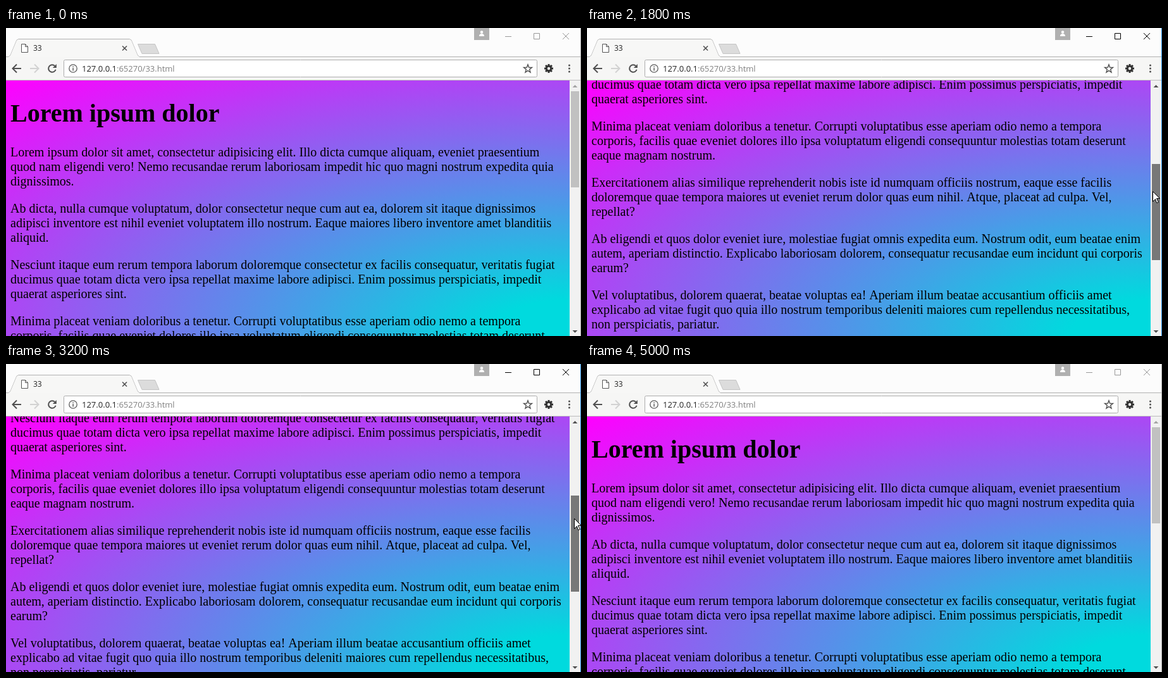
An HTML page with a canvas that plays this animation: 909x487 px, repeating every 5100 ms.

```html
<!DOCTYPE html>
<html lang="en">
<head>
<meta charset="utf-8">
<title>33</title>
<style>
  html, body { margin: 0; width: 100%; height: 100%; overflow: hidden; background: #fff; }
  canvas { display: block; }
</style>
</head>
<body>
<canvas id="stage" width="909" height="487"></canvas>
<script>
const ctx = document.getElementById('stage').getContext('2d');
const W = 909, H = 487, LOOP = 5100, STEP = 100;
const PAGE = { top: 83, width: 891 };
const LINE = 23, PARAGRAPH = 89;
const SERIF = '"Liberation Serif", "Times New Roman", serif';
const SANS = '"Open Sans", sans-serif';
const INK = '#505050';

const paragraphs = `
Lorem ipsum dolor sit amet, consectetur adipisicing elit. Illo dicta cumque aliquam, eveniet praesentium
quod nam eligendi vero! Nemo recusandae rerum laboriosam impedit hic quo magni nostrum expedita quia
dignissimos.

Ab dicta, nulla cumque voluptatum, dolor consectetur neque cum aut ea, dolorem sit itaque dignissimos
adipisci inventore est nihil eveniet voluptatem illo nostrum. Eaque maiores libero inventore amet blanditiis
aliquid.

Nesciunt itaque eum rerum tempora laborum doloremque consectetur ex facilis consequatur, veritatis fugiat
ducimus quae totam dicta vero ipsa repellat maxime labore adipisci. Enim possimus perspiciatis, impedit
quaerat asperiores sint.

Minima placeat veniam doloribus a tenetur. Corrupti voluptatibus esse aperiam odio nemo a tempora
corporis, facilis quae eveniet dolores illo ipsa voluptatum eligendi consequuntur molestias totam deserunt
eaque magnam nostrum.

Exercitationem alias similique reprehenderit nobis iste id numquam officiis nostrum, eaque esse facilis
doloremque quae tempora maiores ut eveniet rerum dolor quas eum nihil. Atque, placeat ad culpa. Vel,
repellat?

Ab eligendi et quos dolor eveniet iure, molestiae fugiat omnis expedita eum. Nostrum odit, eum beatae enim
autem, aperiam distinctio. Explicabo laboriosam dolorem, consequatur recusandae eum incidunt qui corporis
earum?

Vel voluptatibus, dolorem quaerat, beatae voluptas ea! Aperiam illum beatae accusantium officiis amet
explicabo ad vitae fugit quo quia illo nostrum temporibus deleniti maiores cum repellendus necessitatibus,
non perspiciatis, pariatur.

Laboriosam corrupti ad numquam id deleniti eum necessitatibus voluptatum doloremque praesentium,
beatae, atque alias eaque pariatur ullam nam molestiae! Dolores temporibus eligendi vero, expedita odit
dolorem vitae nobis at, corporis.

Molestias accusamus minus, quibusdam culpa fuga ad autem amet illo itaque quaerat saepe voluptatum ab
`.trim().split('\n\n').map(p => p.split('\n'));

// Drag down, pause, drag back up: [time, offset]
const scrollKeys = [[500, 0], [1100, 93], [1800, 308], [2300, 428], [2500, 428], [3200, 289], [3700, 140], [4300, 0]];

const progress = (t, from, to) => Math.min(1, Math.max(0, (t - from) / (to - from)));
const lerp = (a, b, u) => a + (b - a) * u;

// Smooth monotone path through the keys
function curve(keys, t) {
  const last = keys.length - 1;
  if (t <= keys[0][0]) return keys[0][1];
  if (t >= keys[last][0]) return keys[last][1];
  const slope = i => (keys[i + 1][1] - keys[i][1]) / (keys[i + 1][0] - keys[i][0]);
  const tangent = i => {
    if (i === 0 || i === last) return 0;
    const a = slope(i - 1), b = slope(i);
    return a * b <= 0 ? 0 : 2 * a * b / (a + b);
  };
  const i = keys.findIndex(k => t < k[0]) - 1;
  const [t0, v0] = keys[i], [t1, v1] = keys[i + 1];
  const d = t1 - t0, u = (t - t0) / d;
  return lerp(v0, v1, u * u * (3 - 2 * u)) + d * u * (1 - u) * ((1 - u) * tangent(i) - u * tangent(i + 1));
}

function pointer(t, thumbY) {
  const drift = 1 - (1 - progress(t, 1800, 3700)) ** 2;
  const sway = 7 * Math.exp(-(((t - 1800) / 300) ** 2));
  const leave = t >= 4500 ? 5 : 0;
  const grip = lerp(43, 35, drift) - 50 * (1 - progress(t, 100, 300));
  return [Math.round(lerp(900.6, 898, drift) - sway + leave), thumbY + Math.round(grip)];
}

function rect(x, y, w, h, color) {
  ctx.fillStyle = color;
  ctx.fillRect(x, y, w, h);
}

function paint({ fill, stroke, width = 1 }) {
  if (fill) { ctx.fillStyle = fill; ctx.fill(); }
  if (stroke) { ctx.strokeStyle = stroke; ctx.lineWidth = width; ctx.stroke(); }
}

function path(points, style) {
  ctx.beginPath();
  points.forEach(([x, y]) => ctx.lineTo(x, y));
  if (style.close) ctx.closePath();
  paint(style);
}

function arc(x, y, r, style, from = 0, to = Math.PI * 2) {
  ctx.beginPath();
  ctx.arc(x, y, r, from, to);
  paint(style);
}

function box(x, y, w, h, style, radius = 0) {
  ctx.beginPath();
  ctx.roundRect(x, y, w, h, radius);
  paint(style);
}

function text(str, x, y, font, color) {
  ctx.font = font;
  ctx.fillStyle = color;
  ctx.fillText(str, x, y);
}

function cross(x, y, r, style) {
  path([[x - r, y - r], [x + r, y + r]], style);
  path([[x - r, y + r], [x + r, y - r]], style);
}

function drawPage(scroll) {
  const h = H - PAGE.top;
  ctx.save();
  ctx.beginPath();
  ctx.rect(0, PAGE.top, PAGE.width, h);
  ctx.clip();

  // Elliptical gradient from the bottom right to the far corner
  ctx.save();
  ctx.translate(PAGE.width, H);
  ctx.scale(PAGE.width, h);
  const glow = ctx.createRadialGradient(0, 0, 0.1 * Math.SQRT2, 0, 0, Math.SQRT2);
  glow.addColorStop(0, '#00dade');
  glow.addColorStop(1, '#ff00ff');
  rect(-1, -1, 1, 1, glow);
  ctx.restore();

  text('Lorem ipsum dolor', 7, 148 - scroll, `bold 40px ${SERIF}`, '#000');
  paragraphs.forEach((lines, p) => lines.forEach((line, i) =>
    text(line, 7, 203 + p * PARAGRAPH + i * LINE - scroll, `20px ${SERIF}`, '#000')));
  ctx.restore();
}

function drawScrollbar(scroll, thumbY, thumbColor) {
  const triangle = (y, dir, fill) =>
    path([[895.5, y - 2 * dir], [903.5, y - 2 * dir], [899.5, y + 2 * dir]], { fill });
  rect(PAGE.width, PAGE.top, 17, H - PAGE.top, '#f1f1f1');
  rect(893, thumbY, 13, 152, thumbColor);
  triangle(92, -1, scroll ? INK : '#a3a3a3');
  triangle(480, 1, INK);
}

function drawTabs() {
  rect(0, 0, W, 46, '#fcfcfc');
  rect(0, 46, W, 37, '#f6f6f5');

  const left = [[4, 45.5], [7, 43], [17, 19], [20, 17.5]];
  const right = left.map(([x, y]) => [215 - x, y]).reverse();
  path([[0, 45.5], ...left, ...right, [W, 45.5]], { stroke: '#b2b2b2' });
  path([...left, ...right].map(([x, y]) => [x, y + 0.5]), { fill: '#f7f7f6' });
  path([[208.5, 25.5], [235.5, 25.5], [242, 40.5], [215, 40.5]], { fill: '#dcdcdc', stroke: '#c4c4c4', close: true });

  path([[24.5, 25.5], [30.5, 25.5], [34.5, 29.5], [34.5, 38.5], [24.5, 38.5]],
    { fill: '#fff', stroke: '#555', close: true });
  path([[30.5, 25.5], [30.5, 29.5], [34.5, 29.5]], { stroke: '#555' });
  text('33', 43, 36, `12px ${SANS}`, '#222');
  cross(187.5, 32, 3.5, { stroke: INK, width: 1.6 });
}

function drawWindowButtons(active) {
  const color = active ? '#000' : '#999';
  rect(740, 0, 24, 19, '#b0b0b0');
  arc(752, 6.5, 2.2, { fill: '#fff' });
  arc(752, 13, 4, { fill: '#fff' }, Math.PI);
  rect(789, 13, 10, 1, color);
  box(834.5, 8.5, 9, 9, { stroke: color });
  cross(885, 13, 5, { stroke: color });
  rect(W - 1, 0, 1, H, active ? '#1883d7' : '#aaa');
}

function drawArrow(x, y, dir, color) {
  const style = { stroke: color, width: 2 };
  path([[x - 7 * dir, y], [x + 6 * dir, y]], style);
  path([[x, y - 6.5], [x + 6.5 * dir, y], [x, y + 6.5]], style);
}

function drawToolbar() {
  const y = 64;
  drawArrow(17, y, -1, INK);
  drawArrow(45, y, 1, '#d2d2d2');
  arc(73, y, 5.8, { stroke: INK, width: 2 }, 0.3, 5.5);
  path([[79.8, y - 7], [79.8, y - 1], [73.8, y - 1]], { fill: INK });

  box(91.5, 50.5, 748, 27, { fill: '#fff', stroke: '#acacac' }, 2);
  arc(106, y, 6.2, { stroke: '#5a5a5a', width: 1.3 });
  rect(105.3, y - 3.5, 1.5, 1.5, '#5a5a5a');
  rect(105.3, y - 1, 1.5, 4.5, '#5a5a5a');
  const font = `13px ${SANS}`, host = '127.0.0.1';
  text(host, 120, 69, font, '#222');
  text(':65270/33.html', 120 + ctx.measureText(host).width, 69, font, '#808080');

  const star = Array.from({ length: 10 }, (_, i) => {
    const a = i * Math.PI / 5, r = i % 2 ? 2.8 : 6.8;
    return [825 + r * Math.sin(a), y + 0.5 - r * Math.cos(a)];
  });
  path(star, { stroke: INK, width: 1.4, close: true });

  for (let i = 0; i < 4; i++) {
    const a = i * Math.PI / 4, dx = 7 * Math.cos(a), dy = 7 * Math.sin(a);
    path([[858 - dx, y - dy], [858 + dx, y + dy]], { stroke: '#333', width: 3 });
  }
  arc(858, y, 5.2, { fill: '#333' });
  arc(858, y, 2.2, { fill: '#f6f6f5' });
  for (let i = -1; i <= 1; i++) arc(890.5, y + 5 * i, 1.5, { fill: INK });
  rect(0, 82, W, 1, '#bcbcbc');
}

function drawCursor(x, y) {
  const shape = [[0, 0], [0, 16], [4, 12], [6, 18], [9, 17], [6, 11], [11, 11]];
  path(shape.map(([dx, dy]) => [x + dx + 0.5, y + dy + 0.5]), { fill: '#fff', stroke: '#000', close: true });
}

function draw(t) {
  const within = (from, to) => t >= from && t < to;
  const scroll = Math.round(curve(scrollKeys, t));
  const thumbY = 100 + Math.floor(scroll / 2.675);
  const thumbColor = within(500, 4500) ? '#787878' : within(200, 4600) ? '#a8a8a8' : '#c1c1c1';

  drawPage(scroll);
  drawScrollbar(scroll, thumbY, thumbColor);
  drawTabs();
  drawToolbar();
  drawWindowButtons(within(500, 5000));
  if (within(100, 4600)) drawCursor(...pointer(t, thumbY));
}

const start = performance.now();
function tick() {
  const t = (performance.now() - start) % LOOP;
  draw(Math.floor(t / STEP) * STEP);
  requestAnimationFrame(tick);
}
tick();
</script>
</body>
</html>
```
